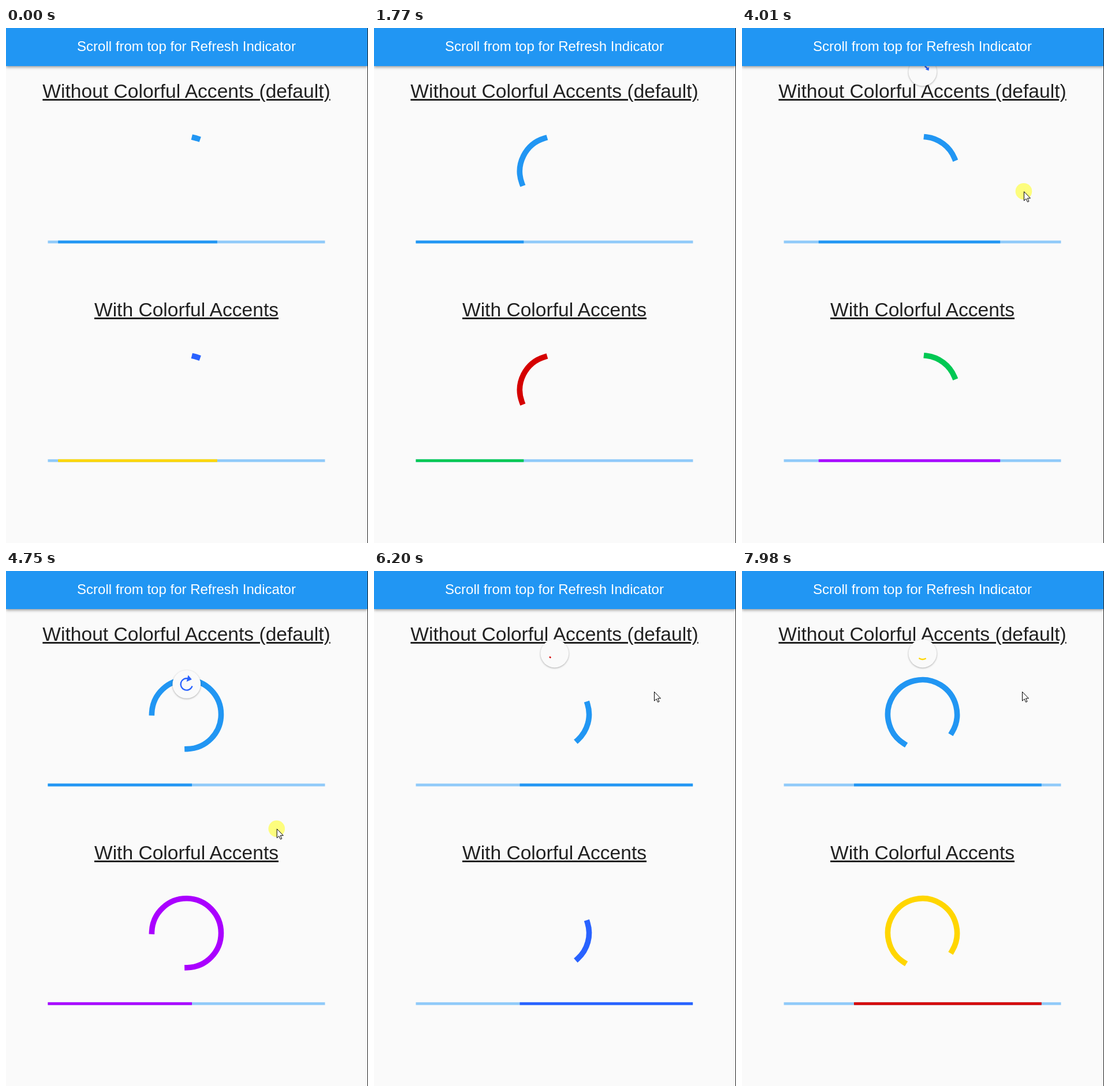
Write an HTML page that moves like this. It is 627 px wide and 893 px high and loops after 8 s.

```html
<!DOCTYPE html>
<html lang="en">
<head>
<meta charset="utf-8">
<title>Refresh Indicator</title>
<style>
  html, body { margin: 0; width: 100%; height: 100%; overflow: hidden; background: #fafafa; }
  body { position: relative; font-family: "Liberation Sans", Arial, sans-serif; }
  header, h1, svg { position: absolute; left: 0; margin: 0; }
  header, h1 { width: 625px; text-align: center; white-space: nowrap; font-weight: 400; }
  header { top: 0; width: 626px; height: 66px; line-height: 64px; font-size: 24px; color: #fff;
    background: #2196f3; box-shadow: 0 2px 5px rgba(0,0,0,.4); text-indent: -1px; }
  h1 { font-size: 33.6px; line-height: 38px; color: #212121; text-decoration: underline; }
  svg { top: 0; display: block; }
  .edge { position: absolute; left: 626px; top: 0; width: 1px; height: 893px; background: #222; }
  .arc { fill: none; stroke-linecap: square; }
  #puck { filter: drop-shadow(0 1.5px 1.5px rgba(0,0,0,.32)); }
</style>
</head>
<body>
<h1 style="top:91px">Without Colorful Accents (default)</h1>
<h1 style="top:470px">With Colorful Accents</h1>
<svg width="627" height="893" viewBox="0 0 627 893">
  <g id="plain"></g>
  <g id="accent" transform="translate(0 379.2)"></g>
  <g id="refresh">
    <circle id="puck" r="24.4" fill="#fafafa"/>
    <path id="ring" class="arc" stroke-width="2.4"/>
    <path id="head" stroke-width="2.4"/>
  </g>
  <g id="mouse">
    <circle id="press" r="14.3" fill="#ff0" fill-opacity=".5"/>
    <path d="M.5 .5V16.2L4.1 12.8L6.6 18.4L9 17.4L6.5 11.9H11.5Z" fill="#fff" stroke="#000" stroke-width="1"/>
  </g>
</svg>
<header>Scroll from top for Refresh Indicator</header>
<div class="edge"></div>
<script>
const LOOP = 8000, PRIMARY = '#2196f3';
const ACCENTS = ['#2962ff', '#d50000', '#ffd600', '#00c853', '#aa00ff'];
const PRESS = 3780, RELEASE = 5178, SETTLE = 5343, PRESS_Y = 232;

// [playback ms, app clock ms]
const CLOCK = [[0, 0], [960, 917], [2590, 2425], [4010, 3706], [5480, 5038], [6970, 6408], [8000, 7434]];
// [playback ms, x, y]
const POINTER = [
  [2200, -14, 378], [2290, 100, 335], [2400, 270, 314], [2500, 400, 296], [2590, 450, 277],
  [2850, 472, 265], [3200, 500, 190], [3450, 508, 210], [3780, 497, 232], [4010, 488, 283],
  [4140, 482, 312], [4480, 472, 390], [4900, 467, 478], [5200, 467, 478], [5480, 472, 318],
  [5850, 485, 209]
];

const $ = id => document.getElementById(id);
const set = (el, attrs) => { for (const k in attrs) el.setAttribute(k, attrs[k]); };
const clamp = (v, lo = 0, hi = 1) => Math.min(hi, Math.max(lo, v));
const accent = n => ACCENTS[n % ACCENTS.length];

function track(keys, t, col = 1) {
  let i = 1;
  while (i < keys.length - 1 && t > keys[i][0]) i++;
  const a = keys[i - 1], b = keys[i];
  return a[col] + (b[col] - a[col]) * clamp((t - a[0]) / (b[0] - a[0]));
}

// Cubic easing with control points (x1, 0) and (x2, 1), limited to an interval
function ease(x1, x2, begin, length) {
  return t => {
    const x = clamp((t - begin) / length);
    if (x === 0 || x === 1) return x;
    let lo = 0, hi = 1, s;
    for (let i = 0; i < 24; i++) {
      s = (lo + hi) / 2;
      const r = 1 - s;
      if (3 * x1 * s * r * r + 3 * x2 * s * s * r + s * s * s < x) lo = s; else hi = s;
    }
    return s * s * (3 - 2 * s);
  };
}

const arcHead = ease(.4, .2, 0, .5), arcTail = ease(.4, .2, .5, .5);
const lines = [
  [ease(.2, .8, 0, 750), ease(.4, 1, 333, 750)],
  [ease(0, .65, 1000, 567), ease(.1, .45, 1267, 533)]
];

// Start and end angle in degrees of the spinner after a number of cycles
function spin(cycles) {
  const n = Math.floor(cycles), u = cycles - n, tail = arcTail(u);
  const start = -90 + 270 * tail + 306 * u - 144 * n;
  return [start, start + Math.max(270 * (arcHead(u) - tail), .3)];
}

const polar = (r, deg) => [r * Math.cos(deg * Math.PI / 180), r * Math.sin(deg * Math.PI / 180)];
const arcPath = (r, [a, b]) => `M${polar(r, a)}A${r} ${r} 0 ${b - a > 180 ? 1 : 0} 1 ${polar(r, b)}`;

function arrowPath(deg, scale) {
  const r = 10.2, w = 3.6 * scale, [ux, uy] = polar(1, deg);
  const tip = [ux * r - uy * 4.8 * scale, uy * r + ux * 4.8 * scale];
  return `M${polar(r - w, deg)}L${polar(r + w, deg)}L${tip}Z`;
}

function makePanel(id) {
  const g = $(id);
  const add = (tag, attrs) => {
    const el = document.createElementNS('http://www.w3.org/2000/svg', tag);
    set(el, attrs);
    return g.appendChild(el);
  };
  const bar = { x: 72.5, y: 368.6, width: 480, height: 4.8 };
  const arc = add('path', { class: 'arc', 'stroke-width': 9.6, transform: 'translate(312.5 248.6)' });
  add('rect', { ...bar, fill: '#90caf9' });
  return { arc, bars: lines.map(() => add('rect', bar)) };
}

function drawPanel({ arc, bars }, cycles, lineTime, arcColor, lineColor) {
  set(arc, { d: arcPath(60, spin(cycles)), stroke: arcColor });
  lines.forEach(([head, tail], i) => {
    const a = tail(lineTime), b = head(lineTime);
    set(bars[i], { x: 72.5 + 480 * a, width: 480 * Math.max(0, b - a), fill: lineColor });
  });
}

const pull = t => 1.5 * clamp((track(POINTER, t, 2) - PRESS_Y) / 206);

function drawRefresh(t, clock) {
  const visible = t >= PRESS, loading = t >= SETTLE;
  $('refresh').style.display = visible ? '' : 'none';
  if (!visible) return;
  let factor = 1;
  if (t < RELEASE) factor = pull(t);
  else if (!loading) factor = track([[RELEASE, pull(RELEASE)], [SETTLE, 1]], t);
  const cycles = loading ? (clock - 4664) / 1000 : factor / 4;
  const angles = spin(cycles), color = accent(Math.floor(cycles));
  set($('refresh'), { transform: `translate(312.8 ${143 + (factor - 1) * 106.8})` });
  set($('ring'), { d: arcPath(10.2, angles), stroke: color });
  set($('head'), { d: loading ? '' : arrowPath(angles[1], clamp(factor)), fill: color, stroke: color });
}

function drawMouse(t) {
  $('mouse').style.display = t >= POINTER[0][0] ? '' : 'none';
  $('press').style.display = t >= PRESS && t < RELEASE ? '' : 'none';
  set($('mouse'), { transform: `translate(${track(POINTER, t)} ${track(POINTER, t, 2)})` });
}

const plain = makePanel('plain'), colorful = makePanel('accent');

function render(t) {
  const clock = track(CLOCK, t);
  const cycles = (clock + 43) / 1000, line = clock + 441;
  drawPanel(plain, cycles, line % 1800, PRIMARY, PRIMARY);
  drawPanel(colorful, cycles, line % 1800, accent(Math.floor(cycles)), accent(Math.floor(line / 1800) + 2));
  drawRefresh(t, clock);
  drawMouse(t);
}

const started = performance.now();
function tick() {
  render((performance.now() - started) % LOOP);
  requestAnimationFrame(tick);
}
tick();
</script>
</body>
</html>
```
